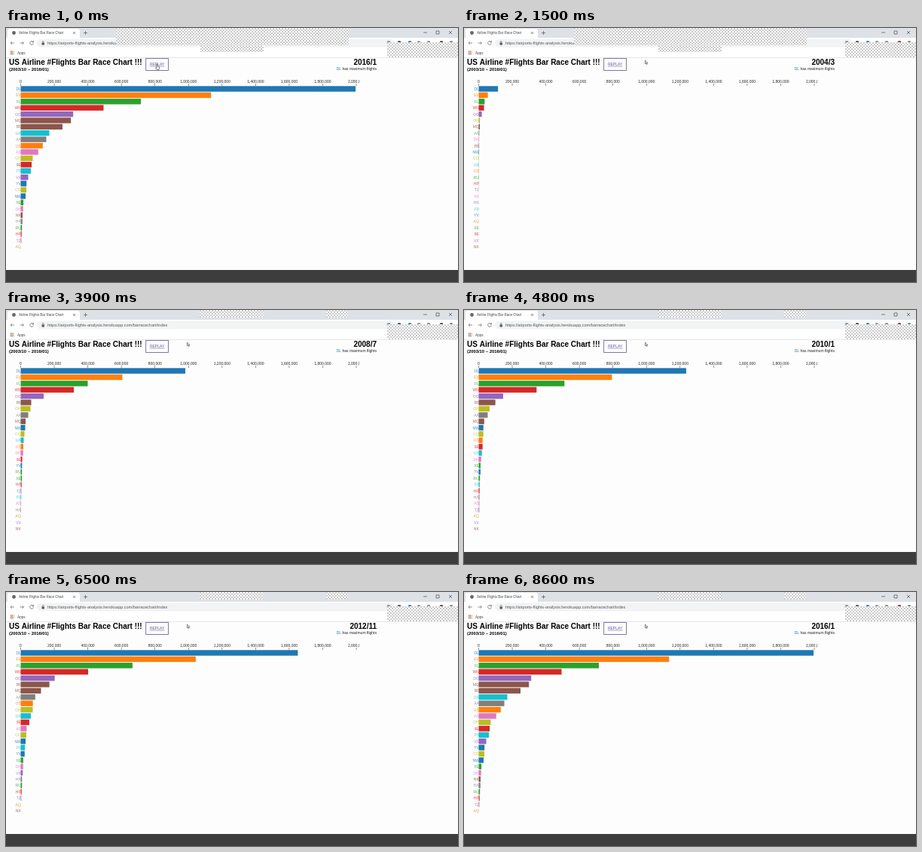
An HTML page with a canvas for the animation above (8700 ms loop, 600 px wide and 338 px high).

```html
<!DOCTYPE html>
<html lang="en">
<head>
<meta charset="utf-8">
<title>Bar Race</title>
<style>
html, body { margin: 0; width: 100%; height: 100%; overflow: hidden; background: #fdfdfd; }
canvas { display: block; width: 600px; height: 338px; }
</style>
</head>
<body>
<canvas id="stage"></canvas>
<script>
const LOOP = 8700, STEP = 100, RESET = 300;
const ZERO_X = 19.5, TICK_GAP = 44.55, ROW_TOP = 77.3, ROW_PITCH = 8.4;
const SANS = '"Liberation Sans", Arial, sans-serif';
const PALETTE = ['#1f77b4', '#ff7f0e', '#2ca02c', '#d62728', '#9467bd',
  '#8c564b', '#e377c2', '#7f7f7f', '#bcbd22', '#17becf'];

// Loop time (ms) at which each key month (counted from 2003/10) is reached.
const KEY_TIMES = [1250, 2500, 3900, 5700, 7300, 8500];
const KEY_MONTHS = [0, 27, 57, 94, 125, 147];

// Bar widths at the key months after the first; the last value holds.
const CARRIERS = Object.entries({
  DL: [122.5, 218.5, 335.5, 402.5, 444.5],
  EV: [57.5, 135, 221, 244.5, 252.7],
  FL: [37, 89, 140, 157.3, 159.5],
  WN: [34, 70.5, 83.5, 96, 110],
  OO: [19, 30.5, 34.5, 56.5, 69.7],
  MQ: [5.5, 6.5, 8.2, 47, 66.7],
  DH: [3.2],
  AA: [4.5, 10, 14, 25, 34],
  CO: [2.6, 5, 7.5],
  UA: [2.2, 4, 4.5, 23, 38],
  NW: [3, 6, 6.5],
  US: [1.8, 3.5, 7, 26, 29.3],
  RU: [1.5, 1.7],
  HP: [1.2],
  TZ: [0.8],
  B6: [3.1, 14, 30.7, 46, 55.5],
  AS: [0.4, 0.6, 1.3, 14.8, 23.3],
  HA: [0.3, 0.5, 1.5, 2, 2.3],
  OH: [8.5, 13, 16],
  F9: [0, 0.7, 2, 9.5, 13.5],
  YV: [0, 1.8, 3, 7.7],
  AQ: [0],
  XE: [0, 1.6, 3.3, 3.4, 3.6],
  '9E': [0, 2, 8.5, 14.5],
  VX: [0, 0, 0, 5.7, 10],
  NK: [0, 0, 0, 0, 2.5]
}).sort((a, b) => (a[0] === '9E') - (b[0] === '9E'))
  .map(([code, widths]) => ({ code, widths }));

// Initial order sets both the colours and the order of ties.
const ORDER = 'DL EV FL WN OO MQ DH AA CO UA NW US RU HP TZ B6 AS HA OH F9 YV AQ XE 9E VX NK'.split(' ');
CARRIERS.forEach(c => {
  const rank = ORDER.indexOf(c.code);
  c.rank = rank;
  c.color = PALETTE[rank % 10];
  const start = rank < 6 ? 3.6 / (rank + 1) : 0;
  c.values = KEY_MONTHS.map((_, i) =>
    i ? c.widths[Math.min(i, c.widths.length) - 1] : Math.min(start, c.widths[0]));
});

const canvas = document.getElementById('stage');
const ratio = window.devicePixelRatio || 1;
canvas.width = 600 * ratio;
canvas.height = 338 * ratio;
const ctx = canvas.getContext('2d');

function interpolate(x, xs, ys) {
  if (x <= xs[0]) return ys[0];
  const i = xs.findIndex(v => x < v);
  if (i < 0) return ys[ys.length - 1];
  return ys[i - 1] + (ys[i] - ys[i - 1]) * (x - xs[i - 1]) / (xs[i] - xs[i - 1]);
}

function rect(x, y, w, h, color) {
  ctx.fillStyle = color;
  ctx.fillRect(x, y, w, h);
}

function dot(x, y, r, color) {
  ctx.fillStyle = color;
  ctx.beginPath();
  ctx.arc(x, y, r, 0, Math.PI * 2);
  ctx.fill();
}

function text(str, x, y, size, color = '#000', align = 'left', weight = '') {
  ctx.font = `${weight} ${size}px ${SANS}`;
  ctx.textAlign = align;
  ctx.fillStyle = color;
  ctx.fillText(str, x, y);
}

function stroke(path, color, width = 0.7) {
  ctx.strokeStyle = color;
  ctx.lineWidth = width;
  ctx.stroke(new Path2D(path));
}

function pill(x, y, w, h, r, color) {
  ctx.fillStyle = color;
  ctx.beginPath();
  ctx.roundRect(x, y, w, h, r);
  ctx.fill();
}

function checker(x, y, w, h) {
  const cell = 2;
  rect(x, y, w, h, '#fff');
  ctx.fillStyle = '#cbcbcb';
  for (let j = 0; j * cell < h; j++)
    for (let i = j % 2; i * cell < w; i += 2)
      ctx.fillRect(x + i * cell, y + j * cell,
        Math.min(cell, w - i * cell), Math.min(cell, h - j * cell));
}

function drawBrowser(t) {
  rect(0, 0, 600, 13, '#dee1e6');
  pill(2, 1, 96, 14, [3, 3, 0, 0], '#fff');
  rect(0, 13, 600, 26, '#fff');
  dot(10.5, 6.5, 2.4, '#666');
  text('Airline Flights Bar Race Chart', 17, 8.2, 4.5, '#444');
  stroke('M89 5l3 3m0-3l-3 3M103 6.5h5m-2.5-2.5v5', '#555');
  stroke('M554 6h5M571 4h4v4h-4zM588 4l4 4m0-4l-4 4', '#333', 0.6);

  pill(41, 14.5, 474, 11, 5.5, '#f1f3f4');
  stroke('M11 20H6m2-2l-2 2 2 2M18.500 20h5m-2-2l2 2-2 2', '#666');
  stroke('M36 18.500a2.400 2.400 0 1 0 .4 2M36.400 17v2h-2', '#555');
  rect(47.5, 19.5, 3.4, 3, '#555');
  stroke('M48.200 19.500v-1a1 1 0 0 1 2 0v1', '#555', 0.6);
  text('https://airports-flights-analysis.herokuapp.com/barracechart/index', 55, 22, 5.5, '#555');
  const icons = { 508: '#7d93a8', 522: '#49525a', 536: '#3e78c4', 548: '#879aa9', 561: '#8b8b8b', 578: '#70432f', 591: '#888' };
  for (const x in icons) dot(+x, 19.5, 2.4, icons[x]);

  const apps = ['#db4437', '#4285f4', '#f4b400', '#0f9d58'];
  for (let i = 0; i < 9; i++)
    rect(6 + i % 3 * 1.8, 30.5 + Math.floor(i / 3) * 1.8, 1.3, 1.3, apps[(i + Math.floor(i / 3)) % 4]);
  text('Apps', 15, 34.6, 4.7, '#444');
  rect(0, 39, 600, 0.6, '#d8dadd');

  if (t < 2900) {
    checker(146, 0, 309, 23);
    checker(258, 23, 84, 9);
  } else {
    checker(257, 0, 85, 10);
    checker(425, 0, 29, 10);
  }
  checker(506, 19, 94, 20);
}

function drawHeader(month, hovering) {
  text('US Airline #Flights Bar Race Chart !!!', 4, 49.3, 10, '#000', 'left', 'bold');
  text('(2003/10 ~ 2016/01)', 4, 57.2, 5.85, '#000', 'left', 'bold');

  const linkColor = hovering ? '#8a4a82' : '#6257a0';
  ctx.strokeStyle = hovering ? '#3f3550' : '#62598f';
  ctx.lineWidth = 0.8;
  ctx.strokeRect(185.7, 40.5, 29.8, 16);
  text('REPLAY', 200.6, 50.2, 5, linkColor, 'center');
  rect(190.7, 50.8, 19.8, 0.5, linkColor);

  const n = 9 + month;
  text(`${2003 + Math.floor(n / 12)}/${n % 12 + 1}`, 492, 49.3, 10, '#000', 'right', 'bold');
  const note = ' has maximum flights';
  text(note, 492, 56.4, 5, '#222', 'right');
  text('DL', 492 - ctx.measureText(note).width, 56.4, 5, PALETTE[0], 'right');
}

function drawChart(month) {
  ctx.save();
  ctx.beginPath();
  ctx.rect(0, 60, 469, 262);
  ctx.clip();
  for (let i = 0; i <= 10; i++) {
    const x = ZERO_X + i * TICK_GAP;
    text((i * 200000).toLocaleString('en-US'), x, 72.8, 5, '#222', 'center');
    rect(x - 0.25, 74, 0.5, 3, '#333');
  }
  ctx.restore();

  CARRIERS.map(c => ({ ...c, width: interpolate(month, KEY_MONTHS, c.values) }))
    .sort((a, b) => b.width - a.width || a.rank - b.rank)
    .forEach((c, row) => {
      const y = ROW_TOP + row * ROW_PITCH;
      rect(ZERO_X, y, c.width, 7.4, c.color);
      ctx.globalAlpha = 0.8;
      text(c.code, ZERO_X + 0.3, y + 5.6, 5, c.color, 'right');
      ctx.globalAlpha = 1;
    });
}

function drawCursor(t) {
  const x = interpolate(t, [1000, 1500], [200, 240.5]);
  const y = interpolate(t, [1000, 1500], [48, 43]);
  const hand = t <= 1200;
  const shape = new Path2D(hand
    ? 'M0 0h1v3l2.500.6v2.400l-.7 1.500h-2.600l-1.700-2.500.5-.6 1 .8z'
    : 'M0 0v4.700l1.100-1 .8 1.800.8-.3-.8-1.800h1.500z');
  ctx.save();
  ctx.translate(x, y);
  ctx.fillStyle = '#fff';
  ctx.strokeStyle = '#333';
  ctx.lineWidth = 0.6;
  ctx.fill(shape);
  ctx.stroke(shape);
  ctx.restore();
}

function draw(now) {
  const t = Math.floor(now % LOOP / STEP) * STEP;
  const month = t < RESET ? 147 : Math.floor(interpolate(t, KEY_TIMES, KEY_MONTHS));
  ctx.setTransform(ratio, 0, 0, ratio, 0, 0);
  rect(0, 0, 600, 338, '#fdfdfd');
  drawBrowser(t);
  drawHeader(month, t >= RESET && t < 1200);
  drawChart(month);
  rect(0, 322, 600, 16, '#3c3d3c');
  if (t >= RESET && t < 1400) {
    rect(0, 314, 138, 8, '#eff0f1');
    text('https://airports-flights-analysis.herokuapp.com/barracechart/index', 1, 319.8, 4.66, '#777');
  }
  drawCursor(t);
}

const start = performance.now();
function tick() {
  draw(performance.now() - start);
  requestAnimationFrame(tick);
}
tick();
</script>
</body>
</html>
```
